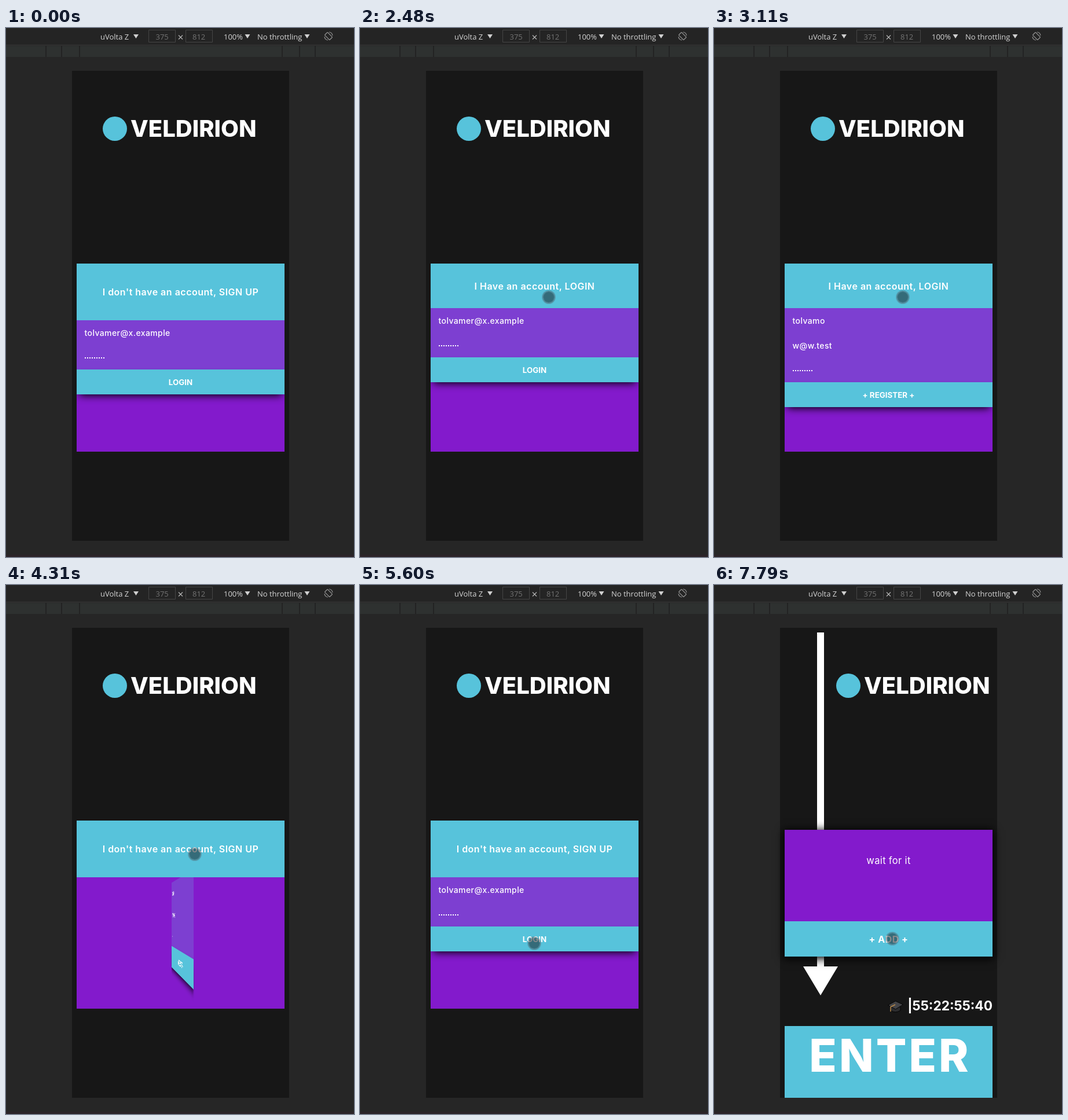
Animation of 601 by 914 pixels, one loop 8 s. Source, as an HTML page:

```html
<!DOCTYPE html>
<html lang="en">
<head>
<meta charset="utf-8">
<title>Login flip</title>
<style>
  :root { --cyan: #57c3db; --violet: #831acc; --loop: 8s infinite; }
  html, body { margin: 0; width: 100%; height: 100%; overflow: hidden; background: #262626; }
  body { position: relative; color: #fff; font-family: Inter, "Open Sans", sans-serif; }
  div, svg { position: absolute; box-sizing: border-box; }
  .full { left: 0; top: 0; width: 601px; height: 914px; overflow: hidden; }
  .mid { display: flex; align-items: center; justify-content: center; white-space: nowrap; }
  .bar text { font: 13px "Open Sans", "Noto Sans", sans-serif; fill: #d5d5d5; }
  .bar .dim { fill: #737373; }

  .phone { left: 114px; top: 74px; width: 375px; height: 812px; background: #171717; }
  .brand { font-weight: 800; font-size: 40px; }
  .logo { animation: shift var(--loop) step-end; }

  /* login / register card */
  .auth { animation: leave var(--loop) step-end; }
  .card { left: 122px; top: 407px; width: 359px; height: 325px; background: var(--violet); }
  .head { left: 0; top: 0; width: 359px; height: 98px; background: var(--cyan);
          animation: head var(--loop) step-end; }
  .head div { inset: 0; font-size: 16px; font-weight: 600; letter-spacing: .5px; }
  .ask { animation: ask var(--loop) step-end; }
  .have { animation: have var(--loop) step-end; }
  .area { left: 0; width: 359px; overflow: hidden; perspective: 1000px;
          animation: area var(--loop) step-end; }
  .form { left: 0; top: 0; width: 359px; background: #7d3fd1; }
  .form.login { height: 128px; animation: login var(--loop); }
  .form.join { height: 171px; animation: join var(--loop); }
  .row { position: relative; height: 42.67px; padding-left: 13.5px; line-height: 43.5px;
         font-size: 14px; font-weight: 450; letter-spacing: .4px; }
  .dots { left: 14px; top: 21.5px; width: 35px; height: 2px;
          background: repeating-linear-gradient(90deg, #fff 0 2.5px, #fff0 2.5px 4px); }
  .btn { left: 0; bottom: 0; width: 359px; height: 43px; background: var(--cyan);
         font-size: 13.4px; font-weight: 650; box-shadow: 0 7px 14px -5px #000; }

  /* countdown page */
  .home { opacity: 0; animation: enter var(--loop) step-end; }
  .box { left: 122px; top: 423px; width: 359px; height: 219px; background: var(--violet);
         box-shadow: 0 2px 14px 2px #000; }
  .wait { left: 0; top: 0; width: 359px; height: 106px; font-size: 16.6px; letter-spacing: .3px; }
  .add { left: 0; top: 158px; width: 359px; height: 61px; background: var(--cyan);
         font-size: 16px; font-weight: 700; letter-spacing: .5px; }
  .clock { font-size: 22.7px; font-weight: 700; }
  .go { font-size: 78px; font-weight: 800; letter-spacing: 4px; }

  .touch { left: -11.5px; top: -11.5px; width: 23px; height: 23px; border-radius: 50%;
           border: 2px solid rgba(80,90,100,.5); background: rgba(20,20,25,.5) padding-box;
           animation: move var(--loop) linear, press var(--loop) step-end; }

  @keyframes leave { 0% { opacity: 1 } 97.375%, 100% { opacity: 0 } }
  @keyframes enter { 0% { opacity: 0 } 97.375%, 100% { opacity: 1 } }
  @keyframes shift { 0% { transform: none } 97.375%, 100% { transform: translateX(44px) } }
  @keyframes head { 0%, 52.125%, 100% { height: 98px } 31% { height: 77px } }
  @keyframes ask { 0%, 52.125%, 100% { opacity: 1 } 31% { opacity: 0 } }
  @keyframes have { 0%, 52.125%, 100% { opacity: 0 } 31% { opacity: 1 } }
  @keyframes area {
    0%, 52.125%, 100% { top: 98px; height: 227px; perspective-origin: 50% 64.5px }
    31% { top: 77px; height: 248px; perspective-origin: 50% 85.5px }
  }
  @keyframes login {
    0%, 31.75% { transform: rotateY(0deg) }
    34.25%, 54.7% { transform: rotateY(-90deg) }
    59.875%, 100% { transform: rotateY(0deg) }
  }
  @keyframes join {
    0%, 34.25% { transform: rotateY(-90deg) }
    38.875%, 52.125% { transform: rotateY(0deg) }
    54.7%, 100% { transform: rotateY(-90deg) }
  }
  @keyframes move {
    0%, 8.24% { transform: translate(575px, 940px) }
    8.25% { transform: translate(560px, 912px); animation-timing-function: ease-in }
    16.875% { transform: translate(441.5px, 727.5px) }
    17.625%, 17.8% { transform: translate(418px, 685px); animation-timing-function: ease-out }
    26.125%, 62.4% { transform: translate(325.5px, 464.5px); animation-timing-function: ease-in }
    65.5% { transform: translate(333px, 510px) }
    68.6% { transform: translate(299px, 621px) }
    70%, 74.6% { transform: translate(300.5px, 618.5px) }
    76.875%, 100% { transform: translate(307.5px, 610.5px) }
  }
  @keyframes press {
    0%, 31%, 52.125%, 83.375%, 100% { box-shadow: none }
    29.375%, 50.375%, 81.75% { box-shadow: 0 0 0 3px rgba(90,90,90,.25) }
  }
</style>
</head>
<body>
<div class="full">
  <svg class="bar" width="601" height="914">
    <rect width="601" height="29" fill="#242424"/>
    <rect y="29" width="601" height="1" fill="#3a3a3a"/>
    <rect y="31" width="601" height="19" fill="#2e3130"/>
    <path d="M69 31v19M96 31v19M127 31v19M477 31v19M507 31v19M534 31v19" stroke="#232323" stroke-width="2"/>
    <rect y="910" width="601" height="4" fill="#2b2328"/>
    <text x="163" y="20">uVolta Z</text>
    <text x="376" y="20">100%</text>
    <text x="434" y="20">No throttling</text>
    <path d="M220 11h9l-4.500 7zM412.500 11h9l-4.500 7zM515.500 11h9l-4.500 7z" fill="#d0d0d0"/>
    <path d="M246.500 3.500h46v21h-46zM310.500 3.500h46v21h-46z" fill="none" stroke="#454545"/>
    <text class="dim" x="258.500" y="20">375</text>
    <text class="dim" x="322" y="20">812</text>
    <path d="M298 12.500l7 7m0-7l-7 7" stroke="#b5b5b5" stroke-width="1.200"/>
    <g fill="none" stroke="#939393" stroke-width="1.200" transform="translate(557 14)">
      <rect x="-3.500" y="-6" width="7" height="12" rx="1" transform="rotate(-45)"/>
      <path d="M-7 1a7 7 0 0 0 6 6M7-1a7 7 0 0 0-6-6"/>
    </g>
  </svg>

  <div class="phone"></div>

  <div class="full home">
    <svg width="601" height="914">
      <path d="M178 82h12v577h24l-30 50l-30-50h24z" fill="#fff"/>
      <path d="M305 729v6q8 6 17 0v-6z" fill="#2c2c2e" stroke="#050505"/>
      <path d="M300.500 726l13-7l13 6l-13 8z" fill="#454548" stroke="#050505"/>
      <path d="M313 725l-8 4v8" fill="none" stroke="#b98b4c" stroke-width="1.500"/>
      <text class="clock" x="481" y="735" text-anchor="end" fill="#fff">|55:22:55:40</text>
      <rect x="122" y="762" width="359" height="124" fill="#57c3db"/>
      <text class="go" x="304" y="841" text-anchor="middle" fill="#fff">ENTER</text>
    </svg>
    <div class="box">
      <div class="wait mid">wait for it</div>
      <div class="add mid">+ ADD +</div>
    </div>
  </div>

  <svg class="logo" width="601" height="914">
    <circle cx="188" cy="174" r="21" fill="#57c3db"/>
    <text class="brand" x="215" y="188" fill="#fff">VELDIRION</text>
  </svg>

  <div class="full auth">
    <div class="card">
      <div class="area">
        <div class="form login">
          <div class="row">tolvamer@x.example</div>
          <div class="row"><div class="dots"></div></div>
          <div class="btn mid">LOGIN</div>
        </div>
        <div class="form join">
          <div class="row">tolvamo</div>
          <div class="row">w@w.test</div>
          <div class="row"><div class="dots"></div></div>
          <div class="btn mid">+ REGISTER +</div>
        </div>
      </div>
      <div class="head">
        <div class="ask mid">I don't have an account, SIGN UP</div>
        <div class="have mid">I Have an account, LOGIN</div>
      </div>
    </div>
  </div>

  <div class="touch"></div>
</div>
</body>
</html>
```
